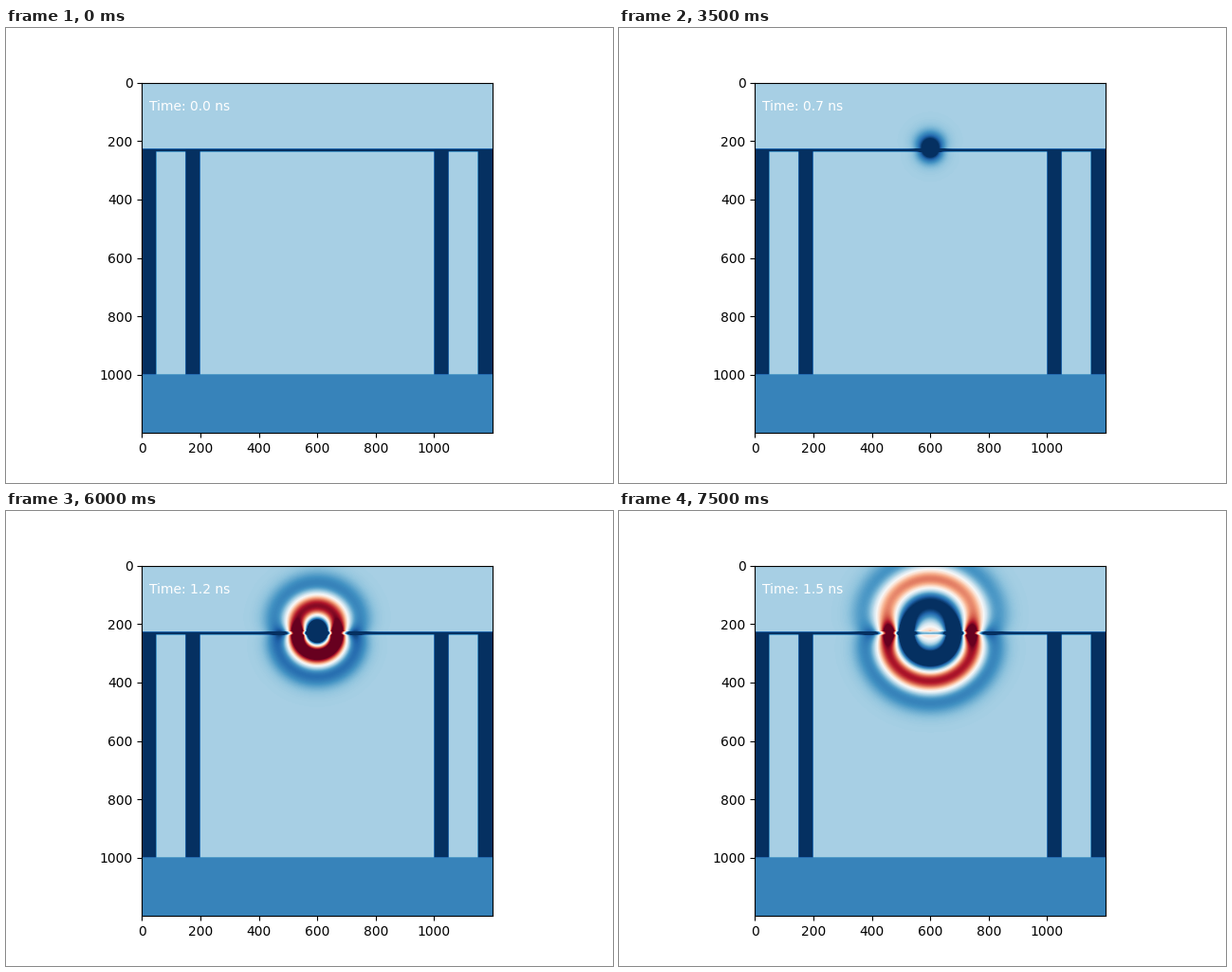
These frames come from a looping animation (640x480 px, 8000 ms). A matplotlib script:

```python
import numpy as np
import matplotlib.pyplot as plt
from matplotlib.animation import FuncAnimation

FRAMES, INTERVAL = 16, 500      # 0.1 ns of simulated time per frame
SIZE = 1200                     # model size in mm, one cell per mm
SRC_X, SRC_Y = 600, 225
SLAB = slice(228, 238)
SLAB_EPS = 4.0
STEPS = 43                      # time steps per frame
C = 299.79                      # mm / ns
FREQ = 1.5                      # GHz
HALF = 360                      # half width of the simulated window
TOP = SRC_Y - HALF              # window starts above the visible area


def material_map():
    ids = np.ones((SIZE, SIZE), np.float32)
    ids[SLAB] = 3
    for x in (0, 150, 1000, 1150):
        ids[SLAB.start:1000, x:x + 50] = 3
    ids[1000:] = 2
    return ids


def ricker_slope(t):
    """Time derivative of a Ricker pulse delayed by sqrt(2) / f."""
    s = (t - np.sqrt(2) / FREQ) * np.sqrt(2) * np.pi * FREQ
    return (s ** 3 - 3 * s) * np.exp(-s * s / 2)


def simulate():
    """Scalar wave from a line source above a thin dielectric slab."""
    n = 2 * HALF
    dt = 0.1 / STEPS
    coef = np.full((n, 1), (C * dt) ** 2, np.float32)
    coef[SLAB.start - TOP:SLAB.stop - TOP] /= SLAB_EPS
    inner = coef[1:-1]
    now = np.zeros((n, n), np.float32)
    old = np.zeros_like(now)
    lap = np.zeros((n - 2, n - 2), np.float32)
    shots = [now.copy()]
    for step in range(STEPS * (FRAMES - 1)):
        np.add(now[:-2, 1:-1], now[2:, 1:-1], out=lap)
        lap += now[1:-1, :-2]
        lap += now[1:-1, 2:]
        lap *= inner
        core = old[1:-1, 1:-1]
        np.subtract(lap, core, out=core)
        core += (2 - 4 * inner) * now[1:-1, 1:-1]
        old[HALF, HALF] += ricker_slope(step * dt)
        now, old = old, now
        if (step + 1) % STEPS == 0:
            shots.append(now.copy())
    # scale so the crest below the slab ends at a fixed height
    gain = 3.5 / shots[-1][HALF + 100:, HALF].max()
    return [s[-TOP:] * gain for s in shots]


materials = material_map()
fields = simulate()


def picture(i):
    img = -materials
    img[:SRC_Y + HALF, SRC_X - HALF:SRC_X + HALF] += fields[i]
    return img


fig, ax = plt.subplots(figsize=(6.4, 4.8), dpi=100)
image = ax.imshow(picture(0), cmap="RdBu_r", vmin=-3, vmax=3)
label = ax.text(0.02, 0.92, "", color="white", transform=ax.transAxes)


def update(i):
    image.set_data(picture(i))
    label.set_text(f"Time: {i / 10:.1f} ns")
    return image, label


anim = FuncAnimation(fig, update, frames=FRAMES, interval=INTERVAL,
                     repeat=True, repeat_delay=0)
plt.show()
```
